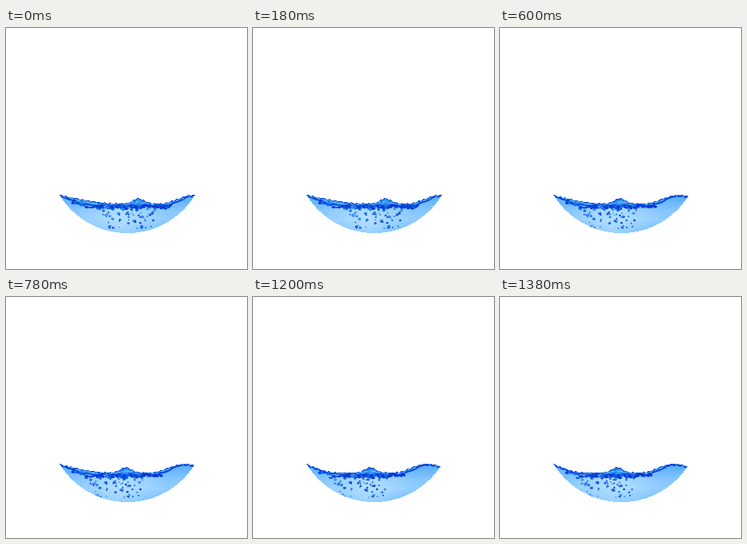
Recreate the animation shown at these times as an HTML page with a canvas. Size 302x302 px, loop 1.5 s.

```html
<!DOCTYPE html>
<html lang="en">
<head>
<meta charset="utf-8">
<title>Water</title>
<style>
  html, body { margin: 0; width: 100%; height: 100%; overflow: hidden; background: #fff; }
  canvas { display: block; width: 302px; height: 302px; }
</style>
</head>
<body>
<canvas id="stage" width="302" height="302"></canvas>
<script>
const ctx = document.getElementById('stage').getContext('2d');
const STEP = 300;
const LEFT = 67, RIGHT = 237, RIM = 209;
const BOWL = { x: 152, y: 157.8, r: 99.2 };

// The trough runs from dip to rise; mound is the peak of the splash.
const right = { dip: 146, rise: 192, mound: 166 };
const middle = { dip: 152, rise: 200, mound: 173 };
const left = { dip: 132, rise: 180, mound: 150 };
const farLeft = { dip: 108, rise: 175, mound: 147 };
const poses = [right, middle, left, middle, farLeft];

function random(seed) {
  return () => (seed = (seed * 16807) % 2147483647) / 2147483647;
}

function swell(x, dip, rise, depth) {
  if (x < dip) return RIM + depth * Math.sin(Math.PI / 2 * (x - LEFT) / (dip - LEFT));
  if (x < rise) return RIM + depth;
  return RIM + depth * (1 + Math.cos(Math.PI * (x - rise) / 44)) / 2;
}

function topAt(x, { dip, rise, mound }) {
  const splash = 6.5 * Math.exp(-(((x - mound) / 10) ** 2));
  return swell(x, dip, rise, 11) - splash + 0.5 * Math.sin(x * 0.9);
}

function lineAt(x, pose) {
  const y = swell(x, 112, pose.rise + 5, 13.5) + 0.5 * Math.sin(x * 0.35);
  return Math.max(y, topAt(x, pose) + 1.5);
}

// Whole-pixel columns keep the outline crisp.
function clipWater(pose) {
  ctx.beginPath();
  for (let x = LEFT; x < RIGHT; x++) {
    const mid = x + 0.5;
    const top = Math.round(topAt(mid, pose));
    const bottom = Math.round(BOWL.y + Math.sqrt(BOWL.r ** 2 - (mid - BOWL.x) ** 2));
    if (bottom > top) ctx.rect(x, top, 1, bottom - top);
  }
  ctx.clip();
}

function traceCurve(curve, from = LEFT, to = RIGHT) {
  const dir = Math.sign(to - from);
  for (let x = from; x !== to + dir; x += dir) ctx.lineTo(x, curve(x));
}

function strokeCurve(curve, color, width, dash = []) {
  ctx.beginPath();
  traceCurve(curve);
  ctx.strokeStyle = color;
  ctx.lineWidth = width;
  ctx.setLineDash(dash);
  ctx.stroke();
}

function dot(x, y, rx, ry, color) {
  ctx.fillStyle = color;
  ctx.beginPath();
  ctx.ellipse(x, y, rx, ry, 0, 0, Math.PI * 2);
  ctx.fill();
}

function drawBody() {
  const depth = ctx.createLinearGradient(0, 208, 0, 257);
  depth.addColorStop(0, '#4ea9fa');
  depth.addColorStop(0.4, '#84c5ff');
  depth.addColorStop(0.65, '#92ccff');
  depth.addColorStop(1, '#66b6ff');
  ctx.fillStyle = depth;
  ctx.fillRect(60, 200, 185, 60);
  const glow = ctx.createRadialGradient(144, 238, 4, 144, 238, 58);
  glow.addColorStop(0, 'rgba(190,228,255,.75)');
  glow.addColorStop(1, 'rgba(190,228,255,0)');
  ctx.fillStyle = glow;
  ctx.fillRect(60, 200, 185, 60);
}

function drawSurface(pose, rnd) {
  const top = x => topAt(x, pose);
  const line = x => lineAt(x, pose);
  const between = k => x => top(x) + k * (line(x) - top(x));
  ctx.beginPath();
  traceCurve(top);
  traceCurve(line, RIGHT, LEFT);
  ctx.fillStyle = '#3598f2';
  ctx.fill();
  strokeCurve(between(0.5), '#6dbffc', 1.2, [9, 5, 4, 3]);
  strokeCurve(between(0.75), '#1468e6', 0.9, [5, 6]);
  strokeCurve(line, '#0440d8', 1.8);
  strokeCurve(top, '#0442cc', 1.8, [7, 1, 4, 2]);
  for (let i = 0; i < 45; i++) {
    const x = LEFT + rnd() * (RIGHT - LEFT);
    dot(x, between(rnd())(x), 1.5, 0.7, i % 3 ? '#0a54dc' : '#62b8fa');
  }
}

function drawFoam(pose, rnd) {
  for (let x = 84; x < pose.rise + 16; x += 1.7) {
    const size = 0.7 + rnd() * 1.4;
    const y = lineAt(x, pose) + rnd() * 3.5;
    dot(x, y, size * 1.3, size, rnd() < 0.7 ? '#0339d6' : '#146aea');
  }
}

function drawBubbles(pose, rnd) {
  const colors = ['#0550e0', '#1672ee', '#2484f0', '#0442d0'];
  for (let i = 0; i < 72; i++) {
    const fall = rnd() ** 1.25;
    const x = pose.mound - 14 + (rnd() - 0.5) * (78 - 20 * fall);
    const y = 226 + fall * 26;
    const r = 0.7 + rnd() * 1.2;
    dot(x, y, r, r * 0.9, colors[i % colors.length]);
    if (r > 1.5) dot(x - 0.3, y - 0.3, 0.6, 0.5, '#7cc2ff');
  }
}

function draw(pose) {
  const rnd = random(29);
  ctx.clearRect(0, 0, 302, 302);
  ctx.save();
  clipWater(pose);
  drawBody();
  drawSurface(pose, rnd);
  drawFoam(pose, rnd);
  drawBubbles(pose, rnd);
  ctx.restore();
}

let shown = -1;
function tick(now) {
  const index = Math.floor(now / STEP) % poses.length;
  if (index !== shown) draw(poses[shown = index]);
  requestAnimationFrame(tick);
}
tick(performance.now());
</script>
</body>
</html>
```
